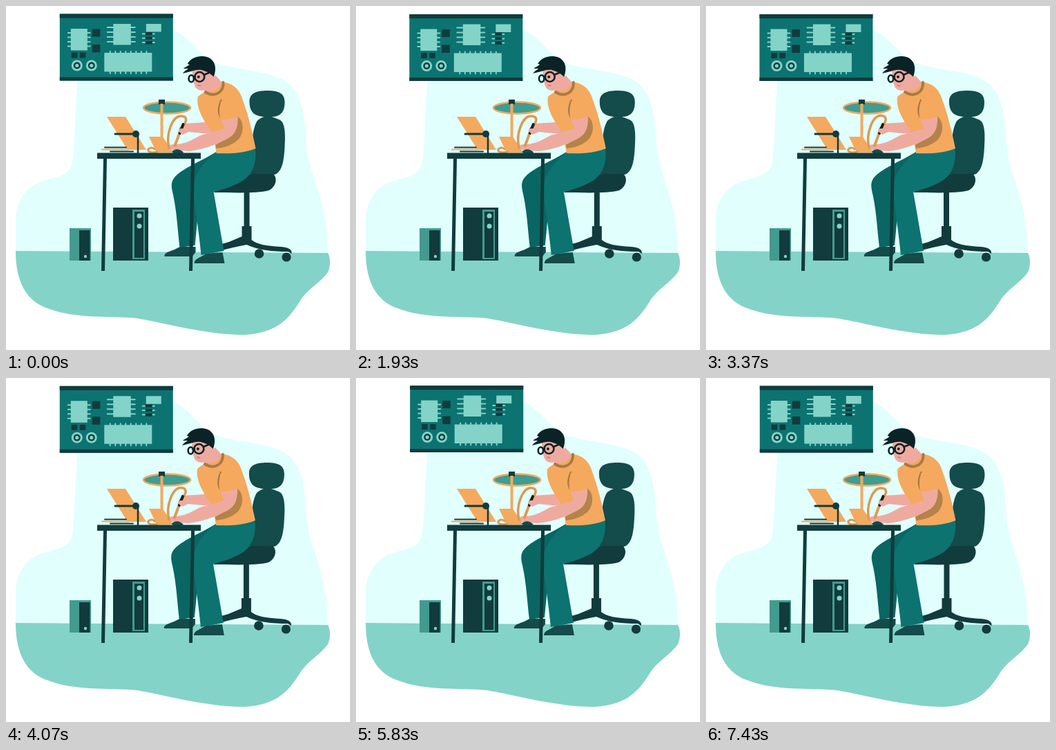
Write an HTML page that moves like this. It is 498 px wide and 500 px high and loops after 7460 ms.

```html
<!DOCTYPE html>
<html lang="en">
<head>
<meta charset="utf-8">
<title>Repair desk</title>
<style>
html, body { margin: 0; width: 100%; height: 100%; overflow: hidden; background: #fff; }
svg { display: block; width: 498px; height: 500px; }
.dark { fill: #113b3d; }
.deep { fill: #144b4b; }
.teal { fill: #0c7371; }
.shade { fill: #0a6663; }
.mint { fill: #84d3c8; }
.mid { fill: #439b90; }
.orange { fill: #f4a95e; }
.brown { fill: #b5824a; }
.skin { fill: #efaaa0; }
.hair { fill: #0a2327; }
.line { fill: none; stroke-linecap: round; stroke-linejoin: round; }
.ink { stroke: #113b3d; }
.cord { stroke: #dc9a52; }
.fold { stroke: #a87a44; }
</style>
</head>
<body>
<svg viewBox="0 0 498 500">
  <path fill="#e1fffd" d="M14 357V312C14 284 29 261 55 254C80 247 92 245 96 227C100 196 100 150 104 100L242 35C266 44 278 70 301 82C331 94 382 93 407 111C430 128 433 165 435 202C439 250 466 280 466 360Z"/>
  <path class="mint" d="M14 356L466 359C470 366 470 378 466 387C455 402 440 409 428 425C411 452 396 475 345 478C290 478 232 461 190 454C150 450 100 455 62 440C30 430 14 402 14 356Z"/>

  <g id="board">
    <path class="teal" d="M78 12H242V109H78Z"/>
    <path class="dark" d="M78 12H242V18H78ZM78 104H242V109H78Z"/>
    <g id="pins" class="line" stroke="#84d3c8" stroke-width="2"></g>
    <path class="mint" d="M94 33.500H118V65H94ZM155.500 26.500H181V57H155.500ZM203 26.500H225V38H203ZM142.500 68.500H211.500V96H142.500Z"/>
    <path class="dark" d="M125 34H136.500V45H125ZM125 56.500H136.500V68H125ZM95 68H103.500V76H95ZM107 68H115.500V76H107ZM202 38.500H212V43H202ZM202 45H212V49H202ZM202 51.500H212V56H202Z"/>
    <g id="coils"></g>
  </g>

  <path class="mid" d="M92 323H123V370H92Z"/>
  <path class="dark" d="M106 326H121.500V370H106Z"/>
  <circle class="mint" cx="115" cy="364" r="2.200"/>
  <path class="dark" d="M155 293H206V370H155Z"/>
  <path class="mid" d="M183 296H201V368H183Z"/>
  <path class="dark" d="M186 299H199V366H186Z"/>
  <g class="mint"><circle cx="193" cy="305" r="3.500"/><circle cx="193" cy="320" r="3.500"/></g>

  <g id="chair">
    <path class="deep" d="M352 139C352 127 361 123 378 123C396 123 403 128 403 140C403 154 397 161 384 161C389 163 394 164 398 167C404 173 404 190 403 204C402 223 400 238 391 244C382 248 362 247 350 244C356 222 353 184 363 167C366 164 370 162 373 161C358 160 352 153 352 139Z"/>
    <path class="dark" d="M300 271C318 256 338 244 360 244H386C393 249 391 263 380 268C362 273 325 271 300 271ZM344 268H352V320H355V340C362 346 376 349 398 350C410 351 414 355 413 360L408 357C385 357 366 355 348 347C330 350 310 356 294 359L284 357C284 351 300 350 322 343L341 335V320H344Z"/>
    <g class="dark"><circle cx="366" cy="360" r="6.800"/><circle cx="405.500" cy="365" r="6.600"/></g>
  </g>

  <g id="body">
    <path class="deep" d="M229 363C229 357 240 357 251 350H274V358L269 364H229Z"/>
    <path class="shade" d="M304 212C282 226 253 236 242 251C237 259 240 267 242 277C247 302 248 326 251 351L273 348C276 318 279 280 282 262L310 240Z"/>
    <path class="deep" d="M272 374C272 367 281 366 289 360L313 358L316 374Z"/>
    <path class="teal" d="M304 212L360 205C364 230 354 249 337 257C323 264 310 268 300 270C305 298 310 329 315 356L282 362C279 330 274 299 271 272C268 246 286 228 304 212Z"/>
    <path class="skin" d="M290 168C278 171 265 169 256 172C249 176 248 181 251 186L258 181L264 183C276 184 288 186 298 185Z"/>
    <path class="skin" d="M284 116L303 101L313 112L309 128L291 130Z"/>
    <path class="orange" d="M277 132C283 127 287 125 290 123C302 125 309 120 312 110C330 113 338 122 342 136C350 158 356 182 361 207C344 214 324 215 304 214C302 199 299 186 292 175C282 161 275 146 277 132Z"/>
    <path class="line fold" stroke-width="4" stroke-linecap="butt" d="M288 125C302 134 315 125 314 111"/>
    <path class="brown" d="M334 160C344 166 345 183 336 194C326 203 315 206 304 207L303 202L316 194C330 190 336 179 334 160Z"/>
    <path class="line fold" stroke-width="2.500" d="M311 163C306 156 307 146 311 137"/>
    <path class="skin" d="M310 164L335 160C336 178 331 187 318 194C302 202 281 210 263 211L239 209C233 207 235 200 244 201C259 201 270 194 281 188L316 178Z"/>
    <path class="orange" d="M311 138C308 150 308 158 310 165C320 165 328 164 336 160L340 135Z"/>
  </g>

  <g id="head">
    <path class="skin" d="M269 94L270 108L273 117C277 124 284 124 291 121L301 108L299 90Z"/>
    <path class="hair" d="M255 98C258 94 261 93 263 91L256 91C260 88 263 87 265 85L262 84C267 74 281 71 290 74C302 78 305 90 300 103C296 99 292 96 288 95C280 91 273 93 267 95Z"/>
    <g class="line" stroke="#0a2327" stroke-width="2.600">
      <circle cx="279.500" cy="103" r="7"/><ellipse cx="267.500" cy="105.500" rx="3.700" ry="5"/><path d="M286 100L293 97M271 103L273 103"/>
    </g>
    <circle class="hair" cx="278" cy="103" r="2"/>
    <path class="line" stroke="#b86865" stroke-width="1.200" d="M277 115L281 116"/>
  </g>

  <path class="orange" d="M146 161H173L203 209H176Z"/>
  <path class="line ink" stroke-width="3" d="M158 186H188"/>
  <path class="line ink" stroke-width="2.500" d="M191 187V213"/>
  <circle class="dark" cx="188" cy="186" r="5"/>
  <path class="line ink" stroke-width="2" d="M143 205.500H174M151 211.500H184"/>
  <path class="line" stroke="#f4a95e" stroke-width="2" d="M139 208.500H177"/>
  <ellipse cx="233" cy="148" rx="34" ry="8.500" fill="#3f9d92" stroke="#f4a95e" stroke-width="2.500"/>
  <path class="dark" d="M221 136H230V143H221Z"/>
  <path class="orange" d="M223.500 142H227.500V194H223.500ZM207 190H227L242 213H218Z"/>
  <path class="line cord" stroke-width="3" d="M219 212C211 214 204 212 206 208Q211 204 215 208"/>
  <path id="cord" class="line cord" stroke-width="3.500"/>
  <g id="iron">
    <path class="line cord" stroke-width="4" stroke-dasharray="3 1" stroke-linecap="butt" d="M251 184L244 203"/>
    <path class="line" stroke="#0a2327" stroke-width="4" d="M256 172L251 185"/>
    <path class="skin" d="M249 182C250 177 255 178 258 178L264 183L255 187Z"/>
  </g>
  <path id="mouse" class="deep" d="M240 212C244 207 251 207 257 213L255 214H242Z"/>
  <path class="dark" d="M132 213.500H282V222H273L270 385H265L268 222H146L143 385H138L141 222H132Z"/>
</svg>
<script>
const get = id => document.getElementById(id);
const move = (id, x, y = 0) => get(id).setAttribute("transform", `translate(${x} ${y})`);
const coil = (x, y) => [["mint", 8], ["dark", 5], ["mint", 2.6]]
  .map(([c, r]) => `<circle class="${c}" cx="${x}" cy="${y}" r="${r}"/>`).join("");

let pins = "";
for (let i = 0; i < 4; i++) {
  pins += `M90 ${39.5 + i * 6.5}H122M147 ${31.5 + i * 7}H187`;
  if (i < 3) pins += `M198 ${41 + i * 6.3}H215`;
}
for (let x = 151; x < 211; x += 7.5) pins += `M${x} 66.5V98.5`;
get("pins").innerHTML = `<path d="${pins}"/>`;
get("coils").innerHTML = coil(103, 87) + coil(124, 87);

const LOOP = 7460;

function draw(now) {
  const turn = now % LOOP / LOOP * Math.PI * 2;
  const wave = Math.cos(4 * turn), drift = Math.sin(turn);
  const sway = 0.9 * wave + 0.3 * drift - 0.4;

  move("board", 0.3 * wave - 0.5 * drift - 0.5, 0.6 * drift - 0.5 * wave);
  move("chair", sway);
  move("body", sway);
  move("head", sway * 1.5);
  move("iron", sway);
  move("mouse", sway * 0.5);

  const x = 256 + sway, top = 159 + wave;
  get("cord").setAttribute("d",
    `M236 206C231 186 241 ${top} 253 ${top}C${x + 7} ${top} ${x + 5} 168 ${x} 174`);
  requestAnimationFrame(draw);
}
requestAnimationFrame(draw);
</script>
</body>
</html>
```
